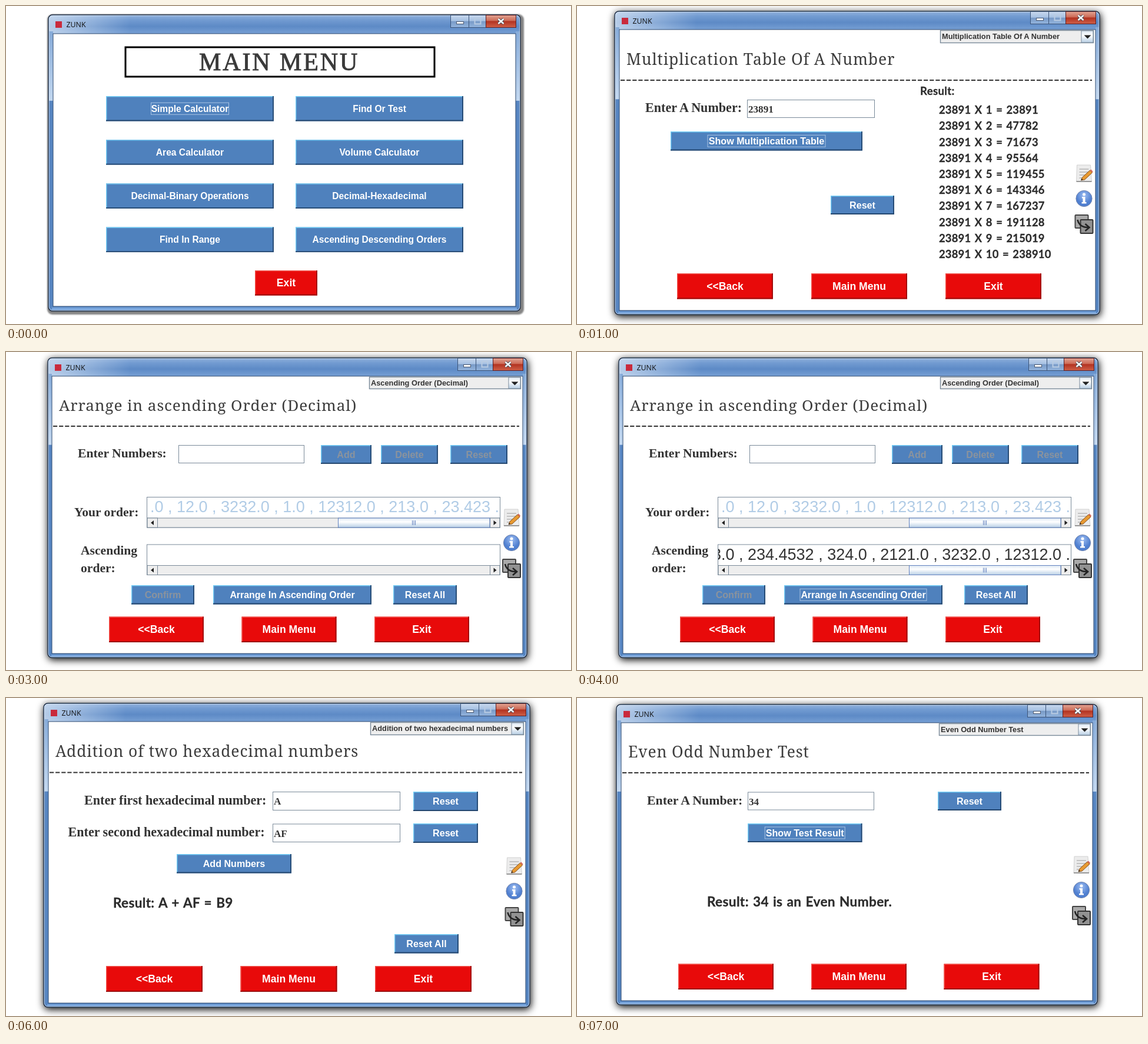
An HTML page for the animation above (8000 ms loop, 960 px wide and 540 px high).

```html
<!DOCTYPE html>
<html lang="en">
<head>
<meta charset="utf-8">
<title>Calculator screens</title>
<style>
html, body { margin: 0; width: 100%; height: 100%; overflow: hidden; background: #fff; }
svg { display: block; width: 960px; height: 540px; }
text { white-space: pre; }
.title { font: 12.4px "Open Sans", sans-serif; fill: #111; }
.head { font-family: "Noto Serif", serif; fill: #3c3c3c; letter-spacing: .87px; }
.label { font-family: "Liberation Serif", serif; font-weight: 700; fill: #333; }
.btn { font-family: "Liberation Sans", sans-serif; font-weight: 700; text-anchor: middle; }
.small { font: 700 12.8px "Liberation Sans", sans-serif; fill: #333; }
.result, .table { font-family: Lato, sans-serif; font-weight: 700; fill: #2c2c2c; stroke: #2c2c2c; stroke-width: .3; }
.result { letter-spacing: .35px; word-spacing: 1.3px; }
.table { font-size: 18.4px; letter-spacing: .2px; word-spacing: 1.8px; }
.list { font: 27px "Liberation Sans", sans-serif; text-anchor: end; }
.banner { font: 42px "Liberation Serif", serif; letter-spacing: 2.9px; fill: #3a3a3a; stroke: #3a3a3a; stroke-width: .9; }
</style>
</head>
<body>
<svg id="stage" viewBox="0 0 960 540" xmlns="http://www.w3.org/2000/svg">
<defs>
  <linearGradient id="bar" x2="0" y2="1">
    <stop offset="0" stop-color="#8fb0dc"/><stop offset=".25" stop-color="#729bd1"/>
    <stop offset=".6" stop-color="#5d8ac6"/><stop offset="1" stop-color="#769fd4"/>
  </linearGradient>
  <linearGradient id="glow">
    <stop offset="0" stop-color="#dce8f6" stop-opacity=".7"/><stop offset="1" stop-color="#dce8f6" stop-opacity="0"/>
  </linearGradient>
  <linearGradient id="side" x2="0" y2="1">
    <stop offset="0" stop-color="#86abd9"/><stop offset="1" stop-color="#c3d8f0"/>
  </linearGradient>
  <linearGradient id="idle" x2="0" y2="1">
    <stop offset="0" stop-color="#d3e2f4"/><stop offset="1" stop-color="#c8daf0"/>
  </linearGradient>
  <linearGradient id="red" x2="0" y2="1">
    <stop offset="0" stop-color="#e2a493"/><stop offset=".45" stop-color="#cd6a56"/>
    <stop offset=".5" stop-color="#b23220"/><stop offset="1" stop-color="#cf6048"/>
  </linearGradient>
  <linearGradient id="ctl" x2="0" y2="1">
    <stop offset="0" stop-color="#c9d9ee"/><stop offset=".47" stop-color="#a5c0e2"/>
    <stop offset=".5" stop-color="#7799c6"/><stop offset="1" stop-color="#94b5de"/>
  </linearGradient>
  <linearGradient id="metal" x2="0" y2="1">
    <stop offset="0" stop-color="#dde8f3"/><stop offset=".4" stop-color="#fff"/><stop offset="1" stop-color="#b8cfe5"/>
  </linearGradient>
  <radialGradient id="ball" cy=".3">
    <stop offset="0" stop-color="#9dbdf2"/><stop offset="1" stop-color="#4f7fd0"/>
  </radialGradient>
  <filter id="soft" x="-10%" y="-15%" width="120%" height="130%">
    <feDropShadow dx="1" dy="3" stdDeviation="6.5" flood-color="#000" flood-opacity="1"/>
  </filter>
  <filter id="edge"><feGaussianBlur stdDeviation=".8"/></filter>
</defs>
</svg>
<script>
const stage = document.getElementById("stage");
const APP = "ZUNK";

const rect = (x, y, r, b, fill, extra = "") =>
  `<rect x="${x}" y="${y}" width="${r - x}" height="${b - y}" fill="${fill}" ${extra}/>`;
const path = (d, fill, extra = "") => `<path d="${d}" fill="${fill}" ${extra}/>`;
const text = (cls, x, y, str, extra = "") => `<text class="${cls}" x="${x}" y="${y}" ${extra}>${str}</text>`;
const size = n => `style="font-size:${n}px"`;
const line = (color, w = 1) => `stroke="${color}" stroke-width="${w}"`;

function closeBox(r, t, active = true) {
  const mark = `M${r - 30} ${t + 6.5}l9 8m0-8l-9 8`;
  return rect(r - 51, t, r, t + 21, active ? "url(#red)" : "#d3e1f3", line(active ? "#5b2028" : "#8fa3bd")) +
    path(mark, "none", line("#4b4f5c", 4.6)) + path(mark, "none", line("#fff", 2.4));
}

function controls(r, t, active) {
  const c = r - 51, m = c - 29, n = m - 31, b = t + 21;
  const edge = active ? "#3c5478" : "#8fa3bd";
  const fill = active ? "url(#ctl)" : "#d3e1f3";
  return rect(n, t, m, b, fill, line(edge)) + rect(m, t, c, b, fill, line(edge)) +
    rect(n + 10, t + 11, n + 22, t + 15, "#fff", line("#4a5870")) +
    rect(m + 10, t + 6, m + 20, t + 15, "none", line(active ? "#b9cbe2" : "#a9b8cc", 2)) +
    closeBox(r, t, active);
}

function frame([l, t, r, b], [cl, ct, cr, cb], active = true, hard = false) {
  const shell = rect(l, t, r, b, active ? "#5785c1" : "url(#idle)", `rx="7" ${line(active ? "#1e2b3f" : "#5d6b7e", 1.4)}`);
  let s = hard
    ? rect(l - 2, t - 1, r + 6, b + 6, "#858585", 'rx="9" filter="url(#edge)"') + shell
    : `<g filter="url(#soft)">${shell}</g>`;
  if (active) {
    const split = t + (b - t) * .29;
    s += rect(l + 1, t + 1, r - 1, ct, "url(#bar)", 'rx="6"') +
      rect(l + 1, t + 1, l + 140, ct, "url(#glow)", 'rx="6"') +
      rect(l + 1, ct - 4, cl, split, "url(#side)") + rect(cr, ct - 4, r - 1, split, "url(#side)") +
      rect(l + 6, cb + 2, r - 6, b - 2, "#78a5dc");
  }
  s += rect(l + 1.2, t + 1.2, r - 1.2, b - 1.2, "none", 'rx="6" stroke="#e4eefa" stroke-opacity=".7"');
  return s + rect(cl, ct, cr, cb, "#fff", line(active ? "#2f4a70" : "#8698ae"));
}

function win(outer, inner, active = true, hard = false) {
  const [l, t] = outer;
  return frame(outer, inner, active, hard) + controls(inner[2] + .5, t + .5, active) +
    rect(l + 12, t + 11, l + 23, t + 22, "#c92a3c") + text("title", l + 30.5, t + 20.5, APP);
}

function button(x, y, r, b, str, o = {}) {
  const red = o.red, px = o.px || (red ? 17.6 : 16.1), cx = (x + r) / 2, cy = (y + b) / 2;
  let s = rect(x, y, r, b, red ? "#e80a0a" : "#4f81bd") +
    path(`M${x + .7} ${b}V${y + .7}H${r}`, "none", line(red ? "#f2504a" : "#73cdf6", 1.4)) +
    path(`M${x} ${b - 1}H${r - 1}V${y}`, "none", line(red ? "#9c0d0d" : "#24476f", 1.8));
  if (o.focus) s += rect(cx - o.focus / 2, cy - 10, cx + o.focus / 2, cy + 10, "none", line("#a9c4e4"));
  return s + text("btn", cx, cy + px * .35, str, `${size(px)} fill="${o.off ? "#8b939d" : "#fff"}"`);
}

const reds = (xs, w, y, b) =>
  ["&lt;&lt;Back", "Main Menu", "Exit"].map((s, i) => button(xs[i], y, xs[i] + w, b, s, { red: true })).join("");

const field = (x, y, r, b, str = "") =>
  rect(x + .5, y + .5, r - .5, b - .5, "#fff", line("#7a8a99")) + text("label", x + 2, y + 22, str, size(17.1));

function combo(x, y, r, b, str) {
  const a = r - 21, m = a + 10.5;
  return rect(x + .5, y + .5, r - .5, b - .5, "#eee", line("#7a8a99", 1.4)) +
    rect(a, y + 1, r - 1, b - 1, "url(#metal)", line("#7a8a99")) +
    path(`M${m - 6} ${y + 8.5}h12l-6 6z`, "#222") + text("small", x + 3, y + 14.5, str);
}

// Notes, info and export icons, placed around the info ball
function icons(x, y) {
  return `<g transform="translate(${x} ${y})">` +
    path("M-12-57H11L13-29H-13Z", "#ececec", line("#d2d2d2")) +
    path("M-8-50H8M-8-45H8M-8-40H4M-8-35H0", "none", line("#c3c3c3", 2)) +
    path("M-13-29H13", "none", line("#777", 1.4)) +
    path("M-5-31L-3-36L10-48L14-44L1-32Z", "#e89a32", line("#86501c")) +
    path("M10-48L12-49.5L15-46L14-44Z", "#d76a5c") + path("M-5-31L-4-34L-2-32Z", "#222") +
    `<circle r="13.6" fill="url(#ball)" ${line("#6f83ad")}/>` +
    path("M-3.5-3H2V6H4V8.5H-4V6H-2V-.5H-3.5Z", "#fff") + '<circle cy="-7" r="2.5" fill="#fff"/>' +
    rect(-15, 28, 7, 50, "#aaa", `rx="1" ${line("#444", 2)}`) +
    rect(-6, 36, 15, 59, "#929292", `rx="1" ${line("#333", 2)}`) +
    path("M-11 36Q-8 49 7 49M2 43L9 49L2 55", "none", line("#222", 2.6)) + "</g>";
}

const page = (x, y, str, px, dash, end) => text("head", x, y, str, size(px)) +
  path(`M${x - 10} ${dash}H${end}`, "none", line("#333", 2.2) + ' stroke-dasharray="7.2 2.9"');

function menu() {
  const names = ["Simple Calculator", "Find Or Test", "Area Calculator", "Volume Calculator",
    "Decimal-Binary Operations", "Decimal-Hexadecimal", "Find In Range", "Ascending Descending Orders"];
  return win([72, 15, 874, 518], [80, 47, 866, 510], true, true) +
    rect(203, 70, 728, 120, "#fff", line("#000", 3)) +
    text("banner", 328, 108.5, "MAIN MENU") +
    names.map((s, i) => {
      const x = i % 2 ? 492 : 170, y = 153 + (i >> 1) * 74.2;
      return button(x, y, x + 285, y + 42.5, s, { px: 15.6, focus: i ? 0 : 132 });
    }).join("") + button(423, 449, 529, 491.5, "Exit", { red: true });
}

function times() {
  const n = 23891;
  let s = win([64, 9, 888, 524], [72, 40, 881, 517]) +
    combo(617, 41, 878, 63, "Multiplication Table Of A Number") +
    page(84, 100, "Multiplication Table Of A Number", 26.5, 126, 875) +
    text("label", 116, 180, "Enter A Number:", size(22.1)) + field(289, 159, 506, 190, n) +
    button(159, 213, 485, 245.5, "Show Multiplication Table", { focus: 200 }) +
    button(431, 322, 539, 354, "Reset") + text("result", 583, 151, "Result:", size(18.6));
  for (let i = 1; i <= 10; i++) s += text("table", 615, 156 + i * 27.2, `${n} X ${i} = ${n * i}`);
  return s + icons(861.5, 327) + reds([170, 398, 626], 163, 454, 497.5);
}

function rhombus() {
  return win([69, 15, 876, 520], [76, 47, 869, 513]) +
    combo(611, 47, 867, 68, "Area of Rhombus") + page(88, 104.5, "Area of Rhombus", 26, 130, 863) +
    text("label", 141, 183, "Enter length of first diagonal:", size(21.8)) +
    text("label", 114, 236, "Enter length of second diagonal:", size(21.8)) +
    field(433, 162, 645, 193, "21") + field(433, 215, 645, 246, "2321") +
    button(715, 162, 822, 194, "Reset") + button(715, 215, 822, 247, "Reset") +
    button(289, 265, 481, 297, "Calculate Area", { focus: 111, px: 15.7 }) +
    text("result", 183, 354.5, "Result: Area of Rhombus: 24370.5 unit ²", size(22.2)) +
    button(651, 398, 758, 430.5, "Reset All") + icons(850.5, 327) + reds([172, 395.5, 619], 160, 451, 494);
}

function pane(y, str, color) {
  const by = y + 36, ey = y + 52;
  let s = rect(239.5, y + .5, 839.5, ey, "#fff", line("#7a8a99")) +
    `<svg x="240" y="${y}" width="598" height="36">${text("list", 598, 26, str, `fill="${color}"`)}</svg>` +
    rect(240, by, 839, ey, "#eee", line("#7a8a99")) +
    rect(240, by, 257.5, ey, "#eee", line("#7a8a99")) + rect(822.5, by, 839, ey, "#eee", line("#7a8a99")) +
    path(`M251 ${by + 4}v8l-5-4zM828.5 ${by + 4}v8l5-4z`, "#222");
  if (str) s += rect(564.5, by, 822, ey, "url(#metal)", line("#6382bf")) +
    path(`M690.5 ${by + 4}v8m2.5-8v8m2.5-8v8`, "none", line("#6382bf"));
  return s;
}

function ascending(done) {
  return win([71, 10, 885, 519], [78, 41, 878, 512]) +
    combo(617, 42, 875, 63, "Ascending Order (Decimal)") +
    page(90, 100, "Arrange in ascending Order (Decimal)", 26.2, 126, 872) +
    text("label", 122, 179, "Enter Numbers:", size(21.7)) + field(293, 158, 507, 189) +
    button(535, 158, 621, 190, "Add", { off: true }) + button(637, 158, 734, 190, "Delete", { off: true }) +
    button(755, 158, 852, 190, "Reset", { off: true }) +
    text("label", 116, 279, "Your order:", size(21.6)) +
    text("label", 127, 344, "Ascending", size(21.6)) + text("label", 127, 373.5, "order:", size(21.6)) +
    pane(246, ".0 , 12.0 , 3232.0 , 1.0 , 12312.0 , 213.0 , 23.423 .", "#b1cce6") +
    pane(326.5, done ? "213.0 , 234.4532 , 324.0 , 2121.0 , 3232.0 , 12312.0 ." : "", "#333") +
    button(213, 396, 320, 428.5, "Confirm", { off: true }) +
    button(352, 396, 621, 428.5, "Arrange In Ascending Order", { focus: done ? 215 : 0, px: 15.9 }) +
    button(658, 396, 766, 428.5, "Reset All") + icons(859, 324) + reds([175, 400.5, 626], 161, 449.5, 493);
}

const option = (x, r, str) =>
  rect(x + .5, 288.5, r - .5, 315.5, "url(#metal)", line("#7a8a99", 1.4)) +
  text("small", (x + r) / 2, 306.5, str, 'text-anchor="middle"');

function dialog() {
  const key = s => `<tspan text-decoration="underline">${s}</tspan>`;
  return frame([327, 196, 628, 337], [335, 228, 620, 330]) +
    rect(335, 228, 620, 330, "#eee") + closeBox(621, 196.5) +
    text("title", 335, 216.5, "Select an Option") +
    rect(349, 243, 379, 272, "#777") + rect(347, 240, 376, 269, "#9ccb9a", line("#6c9a6b")) +
    text("btn", 361.5, 263, "?", 'style="font-size:25px" fill="#111"') +
    text("small", 397, 254, "Your data will not be saved") +
    text("small", 397, 274, "Are You Sure,You Want Leave?") +
    option(384, 441, key("Y") + "es") + option(448, 506, key("N") + "o") + option(512, 570, "Cancel") +
    rect(385.5, 289.5, 439.5, 314.5, "none", line("#7a8a99", 1.5)) +
    rect(400.5, 293.5, 424.5, 310.5, "none", line("#a3b8cc"));
}

function hexAdd(asking) {
  return win([64, 9, 890, 525], [72, 40, 883, 518], !asking) +
    combo(619, 41, 880, 63, "Addition of two hexadecimal numbers") +
    page(84, 100, "Addition of two hexadecimal numbers", 26.5, 126.5, 877) +
    text("label", 133, 181, "Enter first hexadecimal number:", size(22.1)) +
    text("label", 105.5, 235, "Enter second hexadecimal number:", size(22.1)) +
    field(453, 159, 670, 191, "A") + field(453, 213.5, 670, 245, "AF") +
    button(692, 159, 802, 192, "Reset") + button(692, 213, 802, 246, "Reset") +
    button(290, 265, 485, 297.5, "Add Numbers") +
    text("result", 182, 356, "Result: A + AF = B9", size(22.5)) +
    button(660, 401, 769, 433.5, "Reset All") + icons(863.5, 328) +
    reds([170, 398.5, 627], 164, 455, 499) + (asking ? dialog() : "");
}

function evenOdd() {
  return win([67, 11, 884, 521], [75, 42, 876, 514]) +
    combo(615, 43, 873, 64, "Even Odd Number Test") + page(87, 101, "Even Odd Number Test", 26.4, 127, 870) +
    text("label", 119, 181, "Enter A Number:", size(21.85)) + field(290, 159.5, 505, 190.5, "34") +
    button(613, 159, 721, 191, "Reset") + button(290, 213, 484.5, 245, "Show Test Result", { focus: 136 }) +
    text("result", 221, 354, "Result: 34 is an Even Number.", size(22.6)) +
    icons(857, 326) + reds([172, 398, 623.5], 162, 451.5, 495);
}

const screens = [menu(), times(), rhombus(), ascending(false), ascending(true), hexAdd(true), hexAdd(false), evenOdd()];
stage.insertAdjacentHTML("beforeend", screens.map(s => `<g class="screen" display="none">${s}</g>`).join(""));
const groups = [...stage.querySelectorAll(".screen")];
const HOLD = 1000;
let start = null;

function draw(ms) {
  const now = Math.floor(ms / HOLD) % groups.length;
  groups.forEach((g, i) => g.setAttribute("display", i === now ? "inline" : "none"));
}

function tick(t) {
  if (start === null) start = t;
  draw(t - start);
  requestAnimationFrame(tick);
}
draw(0);
requestAnimationFrame(tick);
</script>
</body>
</html>
```
